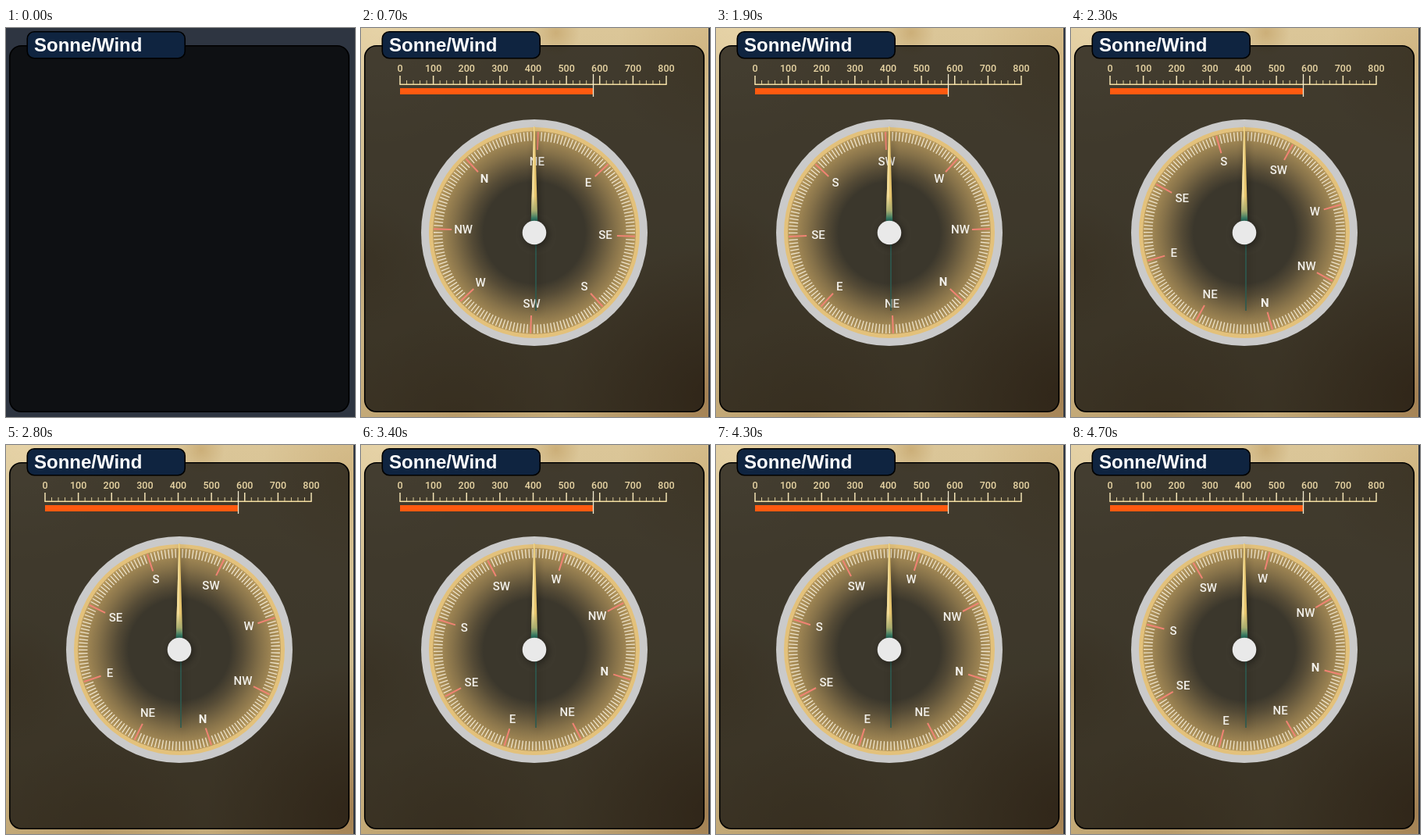
An HTML page with a canvas that plays this animation: 447 px wide and 498 px high, repeating every 5.4 s.

```html
<!DOCTYPE html>
<html lang="de">
<head>
<meta charset="utf-8">
<title>Sonne/Wind</title>
<style>
html, body { margin: 0; width: 100%; height: 100%; overflow: hidden; background: #2e3541; }
canvas { display: block; }
</style>
</head>
<body>
<canvas id="stage" width="447" height="498"></canvas>
<script>
const ctx = document.getElementById('stage').getContext('2d');
const W = 447, H = 498, CX = 222, CY = 262;
const LOOP = 5400, STEP = 100, APPEAR = 200;
const START = 15, DURATION = 4600, BEARING = 255.5;
const POINTS = ['N', 'NE', 'E', 'SE', 'S', 'SW', 'W', 'NW'];
const MINOR = 22;

function line(x1, y1, x2, y2, color, width) {
  ctx.strokeStyle = color;
  ctx.lineWidth = width;
  ctx.beginPath();
  ctx.moveTo(x1, y1);
  ctx.lineTo(x2, y2);
  ctx.stroke();
}

function disc(r, fill) {
  ctx.fillStyle = fill;
  ctx.beginPath();
  ctx.arc(CX, CY, r, 0, 2 * Math.PI);
  ctx.fill();
}

function box(x, y, w, h, r, fill, border) {
  ctx.beginPath();
  ctx.roundRect(x, y, w, h, r);
  ctx.fillStyle = fill;
  ctx.fill();
  ctx.strokeStyle = '#000';
  ctx.lineWidth = border;
  ctx.stroke();
}

function label(text, x, y, font, color, align = 'center') {
  ctx.font = font;
  ctx.fillStyle = color;
  ctx.textAlign = align;
  ctx.fillText(text, x, y);
}

function gradient(g, ...stops) {
  stops.forEach(([at, color]) => g.addColorStop(at, color));
  return g;
}

function stain(x, y, r, rgb, alpha) {
  ctx.fillStyle = gradient(ctx.createRadialGradient(x, y, 0, x, y, r),
    [0, `rgba(${rgb},${alpha})`], [1, `rgba(${rgb},0)`]);
  ctx.fillRect(x - r, y - r, 2 * r, 2 * r);
}

function parchment() {
  ctx.save();
  ctx.beginPath();
  ctx.rect(0, 0, 445, H);
  ctx.clip();
  ctx.fillStyle = gradient(ctx.createLinearGradient(0, 0, 0, H),
    [0, '#dbc698'], [0.5, '#d0bd91'], [1, '#c4aa78']);
  ctx.fillRect(0, 0, W, H);
  stain(20, 0, 150, '240,222,180', 0.5);
  stain(250, 6, 30, '176,132,62', 0.35);
  stain(447, 40, 120, '185,145,80', 0.3);
  stain(447, 470, 190, '120,75,35', 0.45);
  stain(0, 300, 90, '160,120,65', 0.25);
  stain(120, 498, 130, '150,112,65', 0.25);
  ctx.restore();
}

function scale() {
  const left = 50, unit = 341 / 800;
  for (let v = 0; v <= 800; v += 20) {
    const x = left + v * unit, major = v % 100 === 0;
    line(x, major ? 61 : 67, x, 72, major ? '#f3e3b5' : '#d9c894', major ? 1.5 : 1);
    if (major) label(v, x, 56, '500 12.5px Roboto, sans-serif', '#e8d5a4');
  }
  line(left - 0.7, 72.3, 391.7, 72.3, '#f3dda0', 1.6);
  const end = left + 580 * unit;
  ctx.fillStyle = '#ff5a10';
  ctx.fillRect(left, 77, end - left, 8);
  line(end + 0.3, 59, end + 0.3, 88, '#f4ead0', 1.3);
}

function plate(turn) {
  disc(145, '#cacaca');
  disc(135, '#e3c17b');
  disc(130, gradient(ctx.createRadialGradient(CX, CY, 0, CX, CY, 130),
    [0, '#3b372c'], [0.5, '#3b372c'], [0.62, '#554b36'], [0.8, '#857149'], [1, '#b5975c']));

  const count = POINTS.length * MINOR;
  for (let i = 0; i < count; i++) {
    const major = i % MINOR === 0;
    const a = (turn + i * 360 / count) * Math.PI / 180;
    const s = Math.sin(a), c = -Math.cos(a), inner = major ? 106 : 117.5;
    line(CX + inner * s, CY + inner * c, CX + 129 * s, CY + 129 * c,
      major ? '#f08373' : '#eee4cc', major ? 2 : 1.3);
    if (major) {
      const name = POINTS[i / MINOR], r = name.length > 1 ? 91 : 94;
      label(name, CX + r * s, CY + r * c + 4.6,
        `${name === 'N' ? 700 : 500} 15px Roboto, sans-serif`, '#f2f0ea');
    }
  }
}

function needle() {
  ctx.save();
  ctx.shadowColor = 'rgba(2,2,2,.45)';
  ctx.shadowBlur = 10;
  ctx.shadowOffsetX = ctx.shadowOffsetY = 2;
  line(224, 276, 224, 362, '#2c5b50', 1.6);
  const shade = tip => gradient(ctx.createLinearGradient(0, 126, 0, 250),
    [0, tip], [0.72, tip], [0.87, '#a9ad70'], [0.95, '#357a63'], [1, '#1f5a50']);
  ctx.fillStyle = shade('#e6c46d');
  ctx.beginPath();
  ctx.moveTo(221.3, 126);
  ctx.lineTo(222.7, 126);
  ctx.lineTo(226.3, 250);
  ctx.lineTo(217.7, 250);
  ctx.fill();
  ctx.shadowColor = 'transparent';
  ctx.fillStyle = shade('#f2dc98');
  ctx.beginPath();
  ctx.moveTo(221.3, 126);
  ctx.lineTo(222, 126);
  ctx.lineTo(222, 250);
  ctx.lineTo(217.7, 250);
  ctx.fill();
  ctx.shadowColor = 'rgba(2,2,2,.45)';
  disc(15.3, '#e9e9e9');
  ctx.restore();
}

// Falls to rest with ever smaller bounces: 1 at p = 0, 0 at p = 1.
function bounce(p) {
  const q = 1 - p;
  for (let a = 0, b = 1; ; a += b, b /= 2) {
    if (q >= (7 - 4 * a) / 11) return b * b - ((11 - 6 * a - 11 * q) / 4) ** 2;
  }
}

function draw(t) {
  ctx.fillStyle = '#2e3541';
  ctx.fillRect(0, 0, W, H);
  const shown = t >= APPEAR;
  if (shown) parchment();
  box(4.75, 22.75, 434.5, 468.5, 15, 'rgba(0,0,0,.7)', 1.6);
  box(27.25, 4.75, 202, 34, 9, '#0f2440', 1.6);
  label('Sonne/Wind', 36, 30, 'bold 24px "Liberation Sans", Arial, sans-serif', '#fff', 'left');
  if (!shown) return;
  const p = Math.min(1, (t - START) / DURATION);
  scale();
  plate(BEARING * (bounce(p) - 1));
  needle();
}

function tick() {
  const t = performance.now() % LOOP;
  draw(Math.floor(t / STEP) * STEP);
  requestAnimationFrame(tick);
}
tick();
</script>
</body>
</html>
```
